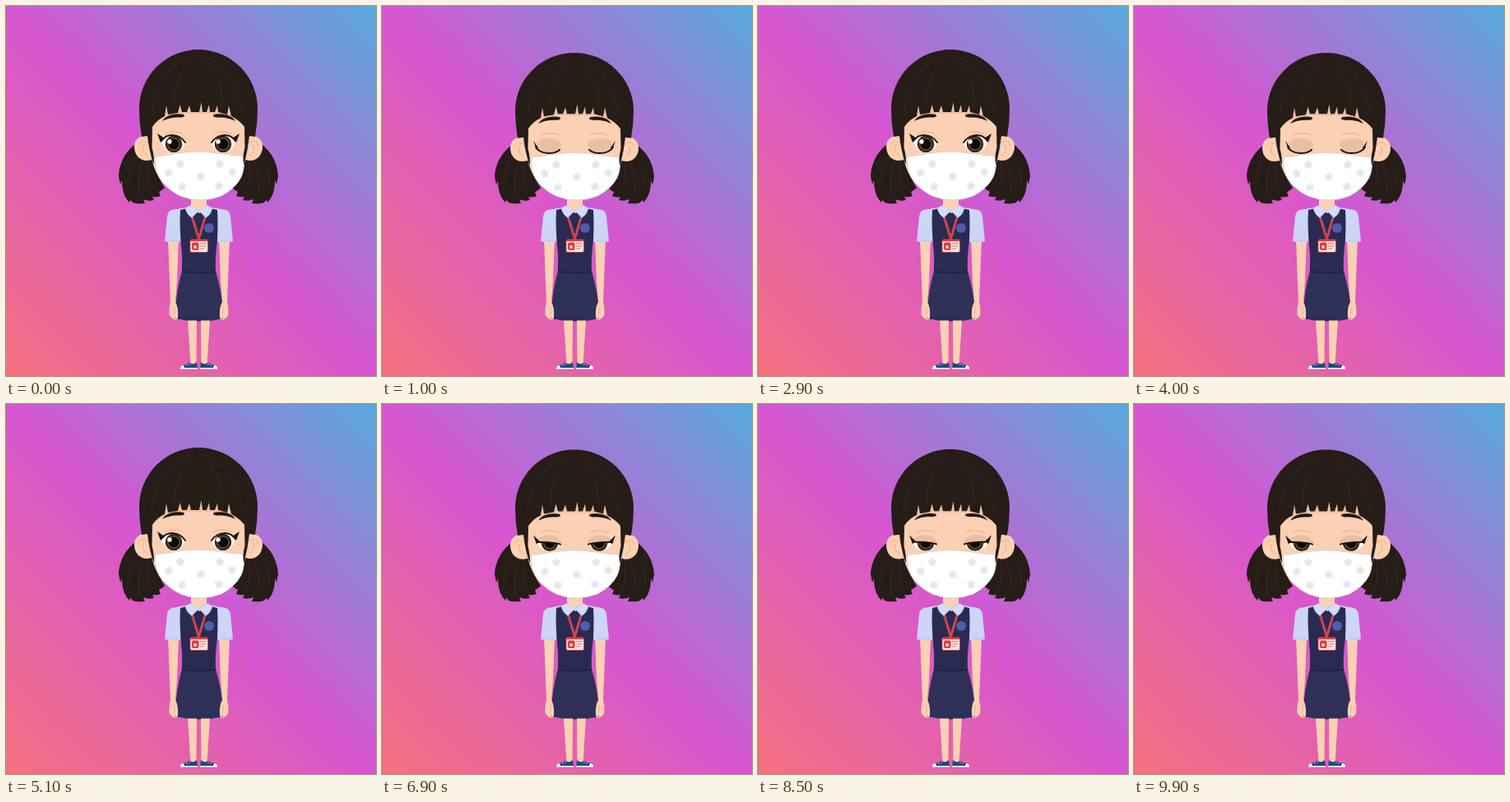
These frames come from a looping animation (450x450 px, 10 s). An HTML page:

```html
<!DOCTYPE html>
<html lang="en">
<head>
<meta charset="utf-8">
<title>Blinking schoolgirl</title>
<style>
  html, body { margin: 0; width: 100%; height: 100%; overflow: hidden; }
  body { background: linear-gradient(45deg, #f6717d, #d656d1 50%, #57abdc); }
  svg { display: block; width: 100%; height: 100%; }
  .skin { fill: #fbd0b3; }
  .hair { fill: #261c18; }
  .strand { fill: none; stroke: #3b302a; stroke-width: .7; }
  .line { fill: none; stroke: #e0a587; stroke-width: .8; stroke-linecap: round; }
</style>
</head>
<body>
<svg viewBox="0 0 450 450">
  <defs>
    <clipPath id="eyeShape"><path class="opening"/></clipPath>
    <g id="ball" clip-path="url(#eyeShape)">
      <path fill="#fff" d="M186 150h34v32h-34z"/>
      <circle cx="204" cy="168" r="10.3" fill="#30261b"/>
      <circle cx="204" cy="168" r="8" fill="#5b4a32"/>
      <circle cx="204" cy="168" r="6.3" fill="#0d0a09"/>
    </g>
    <g id="lid">
      <path class="cover" fill="#e9bfa3"/>
      <path class="lash" fill="none" stroke="#1d1411" stroke-width="2" stroke-linecap="round"/>
      <path class="wing" fill="#1d1411"/>
      <path class="line" stroke="#b98465" d="M193 156Q203 150 215 155"/>
    </g>
    <path id="brow" fill="#211713" d="M190 140Q194 133 205 131.500Q217 130.500 217 133.500Q217 136 207 135.500Q197 136 190 140Z"/>
    <g id="tail">
      <path class="hair" d="M168 162C156 166 138 182 137 207L139 217L141 212C141 224 144 233 150 239L151 236L155 239.500Q162 241 169 240L167 235Q173 238 180 236L178 232Q183 233 188 231L186 226Q189 225 193 221Q183 208 181 184Z"/>
      <path class="strand" d="M164 178Q147 194 148 222M168 184Q158 205 162 232M173 188Q169 209 176 228"/>
    </g>
    <g id="ear">
      <path class="skin" d="M179 159C168 155 156 159 156 171C156 184 167 192 179 186Z"/>
      <path class="line" d="M175 169Q165 159 161 170M168 168Q163 176 172 182"/>
    </g>
    <g id="limbs">
      <path class="skin" d="M197 283H210L208 335L206 360Q210 367 209 379L207 382L205 377L206 382Q200 380 198.500 375Q198 367 200 360Z"/>
      <path class="line" d="M205 366v9"/>
      <path class="skin" d="M221 382.500H232L231.500 436H224.500Z"/>
      <path fill="#1e4a80" d="M223 434Q228 437 232 433L233 441H212Q212 437 219 436Z"/>
      <path fill="#fff" d="M212 440Q213 437 216 437L217 440H233V441.500H212Z"/>
      <path stroke="#d9e4f3" stroke-width=".8" d="M219 436l2 2M222 435l2 2"/>
      <path fill="#cdd5f7" d="M219 245L202 248Q197 249 196 256L193 286Q202 289 212 287L216 262Z"/>
      <path fill="none" stroke="#b4c1e9" stroke-width=".8" d="M194 284Q203 287 211 285"/>
    </g>
    <path id="collar" fill="#d3dcfa" stroke="#b5c2ea" stroke-width=".5" d="M224 242.500L234.500 249L226 257.500Q220 254 218 246Z"/>
    <g id="flower">
      <g fill="#eae9ec">
        <circle cy="-3" r="2.2"/>
        <circle cy="-3" r="2.2" transform="rotate(72)"/>
        <circle cy="-3" r="2.2" transform="rotate(144)"/>
        <circle cy="-3" r="2.2" transform="rotate(216)"/>
        <circle cy="-3" r="2.2" transform="rotate(288)"/>
      </g>
      <circle r="1.2" fill="#dedce2"/>
    </g>
  </defs>

  <g id="body">
    <path fill="#2e3058" d="M214 322H255C260 340 264 360 265 380Q236 387 205.500 380C206 360 209 340 214 322Z"/>
    <use href="#limbs"/>
    <use href="#limbs" transform="matrix(-1 0 0 1 469 0)"/>
    <path class="skin" d="M225 230h19v18l-9 4l-10-4z"/>
    <path fill="#292b52" d="M212 248L221 246L235 252L248 246L257 248Q258 264 257 285Q254 306 255 323Q235 327 214 323Q215 304 212.500 285Q211 264 212 248Z"/>
    <path fill="none" stroke="#191b3c" stroke-width="1" d="M214 323Q235 327 255 323"/>
    <path fill="none" stroke="#cf444f" stroke-width="3" d="M225 252L234.500 283L243.500 252"/>
    <use href="#collar"/>
    <use href="#collar" transform="matrix(-1 0 0 1 469 0)"/>
    <circle cx="247" cy="270" r="6" fill="#525ba8"/>
    <rect x="224" y="284" width="21.500" height="15.500" rx="1.800" fill="#fbe9e2" stroke="#dc3d45"/>
    <path fill="#dc3d45" d="M224 284h21.500v2.300h-21.500z"/>
    <rect x="226" y="287.500" width="8.500" height="9.500" rx="2" fill="#dc3d45"/>
    <circle cx="230" cy="293" r="2" fill="#f6d6c5"/>
    <path stroke="#dc6b6c" stroke-width="1.200" d="M236 289h7.500M236 292h7.500M236 295h5"/>
  </g>

  <g id="head">
    <use href="#tail"/>
    <use href="#tail" transform="matrix(-1 0 0 1 468 0)"/>
    <use href="#ear"/>
    <use href="#ear" transform="matrix(-1 0 0 1 468 0)"/>
    <path class="skin" d="M176 115H292V180Q289 214 262 230Q236 239 209 230Q181 214 176 180Z"/>
    <path fill="#f0c0a1" d="M178 146Q190 134 210 131H258Q278 134 290 146V115H178Z"/>

    <use href="#ball"/>
    <use href="#ball" transform="matrix(-1 0 0 1 468 0)"/>
    <g fill="#fff">
      <circle cx="199" cy="165" r="2.700"/><circle cx="258" cy="165" r="2.700"/>
    </g>
    <use href="#lid"/>
    <use href="#lid" transform="matrix(-1 0 0 1 468 0)"/>

    <path fill="#fff" stroke="#d6d3dc" d="M182 183Q195 182 209 179Q234 175.500 258 179Q274 182 288.500 182.500Q291 197 286 208Q279 222 262 231Q236 241 212 231Q194 222 186 208Q180 196 182 183Z"/>
    <g id="flowers"></g>

    <path class="hair" d="M165 159Q162 142 162 125A72 72 0 0 1 306 125Q306 142 303 159L296 158Q294 176 289.500 193Q287 186 290.500 172L290 147Q284 139 274 134L271 121L269 132L258 129L257 121L254 129H248L247 120L244 129H239L237.500 117L235 129H225L223 121L220 129H214L211.500 120L209 130L197 132L195 121L193 134Q184 138 178 147L177.500 172Q181 186 179.500 193Q174 176 172 158Z"/>
    <path class="strand" d="M222 62Q184 78 177 130M228 60Q206 85 204 122M240 60Q262 85 264 118M246 62Q278 80 288 130"/>
    <g id="brows">
      <use href="#brow"/>
      <use href="#brow" transform="matrix(-1 0 0 1 469 0)"/>
    </g>
  </g>
</svg>
<script>
const $ = selector => document.querySelector(selector);
const LOOP = 10000, STEP = 100, CHIN = 238, HEIGHT = 185;

// Per step: eyelid closure and how far the crown sinks; slow blinks rebound.
const slow = {
  lid: [.2, .5, 1, 1, .5, 0],
  sink: [1, 2.5, 4, 4, 2, 0, -2, -3.2, -2, -1, -.4]
};
const quick = { lid: [.5, 1, .5], sink: [2, 4, 2] };
const blinks = [[100, slow], [800, slow], [3700, slow], [6800, slow], [8300, quick], [9800, slow]];

$('#flowers').innerHTML = [[212, 192], [260, 192], [198, 203], [275, 202], [237, 207], [214, 220], [259, 219]]
  .map(([x, y]) => `<use href="#flower" x="${x}" y="${y}"/>`).join('');

const mix = (a, b, k) => a + (b - a) * k;

function draw(time) {
  const [start, blink] = blinks.findLast(([at]) => at <= time) || [time, { lid: [0], sink: [0] }];
  const step = Math.floor((time - start) / STEP);
  const lid = blink.lid[step] || 0;
  const sink = blink.sink[step] || 0;

  const scale = 1 - sink / HEIGHT;
  $('#head').setAttribute('transform', `matrix(1 0 0 ${scale} 0 ${CHIN * (1 - scale)})`);
  $('#brows').setAttribute('transform', `translate(0 ${lid})`);

  // The upper edge drops until it meets the lower one.
  const at = (x0, y0, x1, y1) => `${mix(x0, x1, lid)} ${mix(y0, y1, lid)}`;
  const corner = at(189, 164, 187, 170);
  const edge = `M${corner}C${at(196, 154.5, 192, 179)} ${at(210, 154.5, 208, 180)} ${at(218, 166, 216, 173.5)}`;
  $('.opening').setAttribute('d', `${edge}C${at(213, 183, 208, 180)} ${at(194, 183, 192, 179)} ${corner}Z`);
  $('.lash').setAttribute('d', edge);
  $('.cover').setAttribute('d', `${edge}L218 166C${at(210, 154.5, 211, 157)} ${at(196, 154.5, 194, 157)} 188 165Z`);
  $('.wing').setAttribute('d', `M${at(184, 155, 184, 162)}L${at(193, 161, 190, 171)}L${at(188, 166, 188, 173)}Z`);
}

function tick() {
  draw(Math.floor(performance.now() % LOOP / STEP) * STEP);
  requestAnimationFrame(tick);
}
tick();
</script>
</body>
</html>
```
